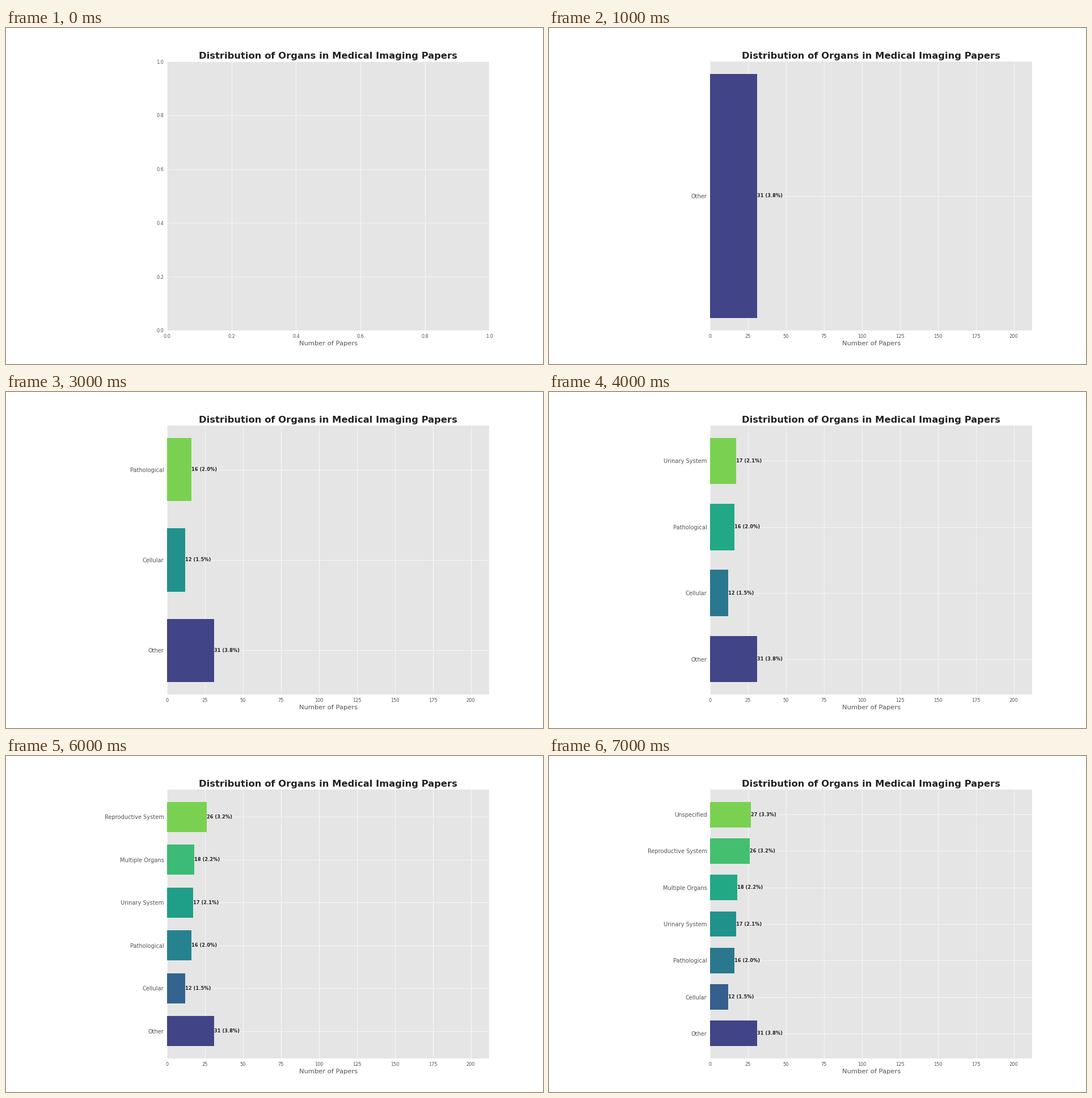
A matplotlib script that plays this animation: 947x592 px, repeating every 8 s.

```python
import numpy as np
import matplotlib.pyplot as plt
from matplotlib.animation import FuncAnimation

plt.style.use("ggplot")

ORGANS = [
    ("Other", 31),
    ("Cellular", 12),
    ("Pathological", 16),
    ("Urinary System", 17),
    ("Multiple Organs", 18),
    ("Reproductive System", 26),
    ("Unspecified", 27),
]
TOTAL = 816
LARGEST = 193
INK = "#222222"

fig = plt.figure(figsize=(16, 10), dpi=59.2)
ax = fig.add_axes([0.3, 0.1, 0.6, 0.8])
ax.spines[:].set_visible(False)


def draw_bars(shown):
    names, counts = zip(*shown)
    rows = np.arange(len(shown))
    colors = plt.cm.viridis(np.linspace(0.2, 0.8, len(shown)))
    ax.barh(rows, counts, height=0.7, color=colors)
    ax.set_yticks(rows, names, fontsize=12)
    ax.set_xlim(0, LARGEST * 1.1)
    for row, count in zip(rows, counts):
        ax.text(count, row, f"{count} ({count / TOTAL:.1%})", va="center",
                fontsize=10, fontweight="bold", color=INK)


def update(step):
    """Show the first `step` categories; step 0 is the empty chart."""
    ax.clear()
    if step:
        draw_bars(ORGANS[:step])
    ax.tick_params(left=False, bottom=False)
    ax.set_title("Distribution of Organs in Medical Imaging Papers",
                 fontsize=20, fontweight="bold", color=INK)
    ax.set_xlabel("Number of Papers", fontsize=14)
    return []


anim = FuncAnimation(fig, update, frames=len(ORGANS) + 1, interval=1000,
                     init_func=lambda: update(0), repeat=True, repeat_delay=0)
plt.show()
```
